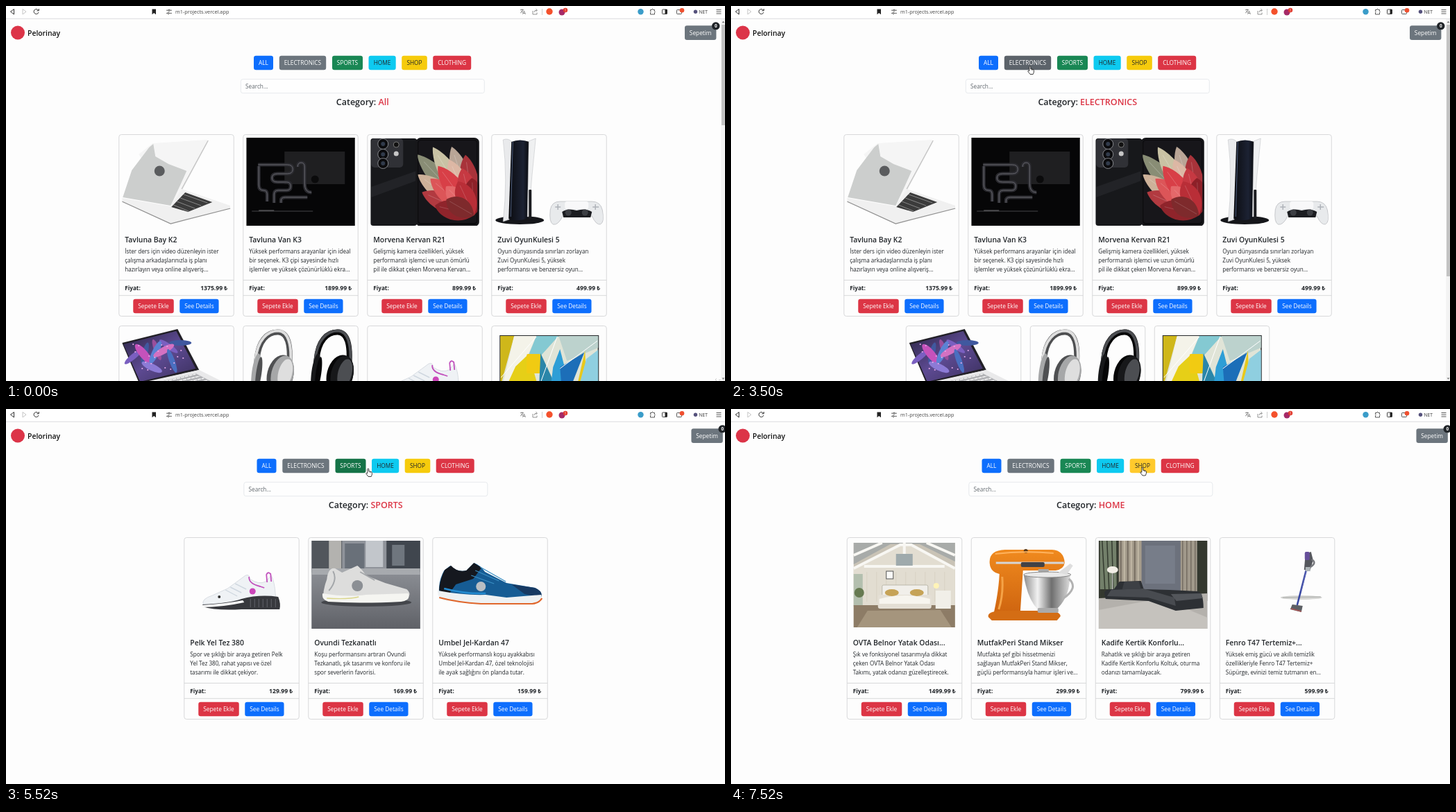
Recreate the animation shown at these times as an HTML page. Size 1036 by 541 pixels, loop 8 s.

```html
<!DOCTYPE html>
<html lang="tr">
<head>
<meta charset="utf-8">
<title>Shop</title>
<style>
html, body { margin: 0; width: 100%; height: 100%; overflow: hidden; background: #fdfdfd; }
svg { display: block; }
text { font-family: "Open Sans", "Noto Sans", sans-serif; white-space: pre; }
</style>
</head>
<body>
<svg id="stage" width="1036" height="541" viewBox="0 0 1036 541"></svg>
<script>
const INK = '#212529', RED = '#dc3545', BLUE = '#0d6efd', GREY = '#6c757d';

const rect = (x, y, w, h, fill, rx = 0, more = '') =>
  `<rect x="${x}" y="${y}" width="${w}" height="${h}" rx="${rx}" fill="${fill}" ${more}/>`;
const poly = (points, fill, more = '') => `<polygon points="${points}" fill="${fill}" ${more}/>`;
const path = (d, fill, more = '') => `<path d="${d}" fill="${fill}" ${more}/>`;
const line = (d, color, width = 1, more = '') =>
  `<path d="${d}" fill="none" stroke="${color}" stroke-width="${width}" ${more}/>`;
const oval = (cx, cy, rx, ry, fill, turn = 0, more = '') =>
  `<ellipse cx="${cx}" cy="${cy}" rx="${rx}" ry="${ry}" fill="${fill}" transform="rotate(${turn} ${cx} ${cy})" ${more}/>`;
const dot = (x, y, r, fill, more = '') => oval(x, y, r, r, fill, 0, more);
const text = (x, y, s, size = 8.15, fill = INK, anchor = 'start', weight = 400) =>
  `<text x="${x}" y="${y}" font-size="${size}" fill="${fill}" text-anchor="${anchor}" font-weight="${weight}">${s}</text>`;
const at = (x, y, s) => `<g transform="translate(${x} ${y})">${s}</g>`;
const repeat = (n, draw) => Array.from({ length: n }, (_, i) => draw(i)).join('');

const defs = `<defs>
<linearGradient id="dusk" x2="1" y2="1"><stop stop-color="#2b2544"/><stop offset=".5" stop-color="#5d4a92"/><stop offset="1" stop-color="#3a2f5c"/></linearGradient>
<linearGradient id="tower"><stop stop-color="#0b0c10"/><stop offset=".7" stop-color="#1c2233"/><stop offset="1" stop-color="#07080b"/></linearGradient>
<linearGradient id="orange" x2="0" y2="1"><stop stop-color="#f08a1e"/><stop offset="1" stop-color="#cf6510"/></linearGradient>
<linearGradient id="steel"><stop stop-color="#8d8d8d"/><stop offset=".3" stop-color="#f2f2f2"/><stop offset=".6" stop-color="#6f6f6f"/><stop offset="1" stop-color="#dcdcdc"/></linearGradient>
<linearGradient id="road" x2="0" y2="1"><stop stop-color="#8b8e94"/><stop offset="1" stop-color="#5f6167"/></linearGradient>
</defs>`;

const headset = (light, mid, dark) =>
  line('M15 50C16 15 32 4 46 4.5C60 5 64 24 62 50', dark, 8) +
  line('M13 48C15 14 32 2.5 46 2.5C61 3 65 24 64 46', light, 4) +
  oval(14, 62, 6, 27, mid, 8) + oval(18, 64, 4, 24, dark, 8) +
  oval(49, 66, 19, 29, dark, 14) + oval(52, 65, 16, 27, mid, 14) + oval(56, 64, 10, 21, light, 14);

const petal = ([turn, length, color]) =>
  `<g transform="translate(149 112) rotate(${turn}) scale(1 ${length / 100})">` +
  path('M0 0C-20 -30 -17 -80 0 -100C17 -80 20 -30 0 0Z', color) + line('M0 -8V-88', '#ffffff40', .8) + '</g>';

// Every picture is drawn in a 156.5 x 127 box.
const pictures = {
  whiteLaptop: () =>
    poly('24,24 44,8 122,3 124,6 88,74 72,98', '#f5f5f5') +
    poly('1,86 14,47 39,14 45,9 48,27 67,38 93,48 84,68 70,98', '#cccecd') +
    line('M124 4L86 74', '#c4c4c4', 1.4) +
    poly('0,87 70,99 86,74 156,98 155,103 70,125 0,93', '#f0f0f0') +
    poly('71,100 91,79 130,93 95,107', '#3b3b3b') +
    repeat(4, i => line(`M${74 + i * 5} ${97 - i * 5}L${96 + i * 9} ${106 - i * 4}`, '#a9a9a9', .7)) +
    line('M0 92L70 124L156 102', '#8f8f8f', 1.2) + dot(54, 48, 7.5, '#5a5c5e'),

  darkLaptop: () =>
    rect(0, 0, 157, 127, '#060607') + rect(55, 20, 87, 47, '#1f1f21') +
    ['#2b2b30', '#68686f'].map((c, i) => line(
      'M17 39H59Q67 39 67 45.5T59 52H45Q37 52 37 58T45 64H58Q64 64 64 70T58 76H46Q40 76 40 82V94' +
      'M18 41V68Q18 76 25 76Q30 76 30 82V92M74 42Q74 36 79 36Q84 36 84 42V66Q84 79 94 79M50 94V91Q50 86 56 86H88', c, 5 - i * 4)).join('') +
    dot(99, 60, 5.5, '#0b0b0c') + line('M8 106H96', '#55555a', .8) + line('M18 105H40', '#8c8c90', .8),

  phone: () =>
    rect(0, 1, 67, 126, '#17181b', 4) + rect(1, 1, 46, 42, '#303136', 5) +
    [9, 24, 37].map(y => dot(18, y, 7.5, '#0b0b0d', 'stroke="#85878c"') + dot(18, y, 3, '#303a4a')).join('') +
    dot(37, 10, 4, '#111', 'stroke="#777"') + dot(37, 23, 3.5, '#c6c6c6') +
    poly('1,71 66,48 66,62 1,86', '#222327') +
    rect(66, 1, 90, 126, '#09090b', 6) + rect(69, 4, 84, 119, '#17161a', 4) +
    [[-43, 120, '#898d75'], [-31, 115, '#c9c2a4'], [-54, 100, '#cdb199'], [-18, 104, '#b9a596'],
     [-8, 88, '#a8333a'], [-66, 82, '#b23a40'], [-24, 88, '#dcb7a4'], [-50, 82, '#dc5558'],
     [-36, 88, '#d83f47'], [-14, 70, '#c63942'], [-76, 58, '#8f242b'], [-3, 54, '#8d2028'],
     [-44, 58, '#e4686a'], [-25, 54, '#b92e37'], [-60, 46, '#7e2a2c']].map(petal).join('') +
    rect(66.5, 1.5, 89, 125, 'none', 6, 'stroke="#17171a" stroke-width="3"'),

  console: () =>
    oval(36, 119, 35, 6, '#15161a') +
    path('M12 3Q19 0 25 6L21 118L12 121Q19 60 12 3Z', '#e9eaec', 'stroke="#b9bbbf" stroke-width=".5"') +
    path('M24 6Q36 1 50 6L48 116Q32 122 20 117Z', 'url(#tower)') +
    path('M49 5L59 1Q53 55 49 114L47 114Z', '#eff0f1', 'stroke="#b9bbbf" stroke-width=".5"') +
    line('M26 6L23 114', '#5f7399', .8) + rect(49, 75, 4, 42, '#1b1c20', 1) +
    path('M80 104Q82 92 94 92H140Q152 92 155 104Q159 122 152 125Q146 126 140 113H98Q91 127 84 125Q78 122 80 104Z', '#e8eaec', 'stroke="#a9acb1" stroke-width=".6"') +
    path('M97 107Q105 101 118 105Q131 101 140 107L138 115H99Z', '#1b1c20') + rect(101, 92, 34, 11, '#f8f8f9', 3) +
    dot(106, 108, 4.5, '#3b3d42') + dot(130, 108, 4.5, '#3b3d42') +
    line('M87 100H95M91 96V104M141 100H150M145 96V104', '#afb3b9', 1.5),

  flowerLaptop: () =>
    poly('0,20 80,0 111,59 25,79', '#222027') + poly('2,22 78,3 106,57 26,76', 'url(#dusk)') +
    repeat(5, i => oval(16 + i * 17, 40 - i * 5, 4, 16, ['#7a5fc0', '#40589f', '#9a4f9c'][i % 3], 50 - i * 35)) +
    oval(31, 36, 6, 18, '#c552bb', -40) + oval(48, 34, 5, 18, '#5b82d4', 25) +
    oval(60, 31, 5, 17, '#d371c2', 60) + oval(43, 55, 5, 16, '#8c7bd6', -65) + oval(72, 46, 4, 18, '#4a6fc0', -20) +
    repeat(18, i => dot(16 + i * 23 % 74, 22 + i * 17 % 42, 1.1, '#e2a8e8')) +
    poly('25,78 111,59 157,82 140,105 30,105', '#e9e9ea') + poly('42,79 106,64 143,83 60,100', '#b1b2b5') +
    repeat(6, i => line(`M${44 + i * 3} ${80 + i * 3}L${106 + i * 6} ${65 + i * 3}`, '#f6f6f6', 1.5, 'stroke-dasharray="5 1"')),

  headphones: () =>
    headset('#dedede', '#a6a7a8', '#4f5052') + at(86, 0, headset('#4c4e52', '#17181a', '#060607')),

  airShoe: () =>
    path('M23 92Q20 84 36 79L58 69L84 50Q90 48 90 55Q103 64 113 59L121 50Q126 60 127 78L132 91Z', '#eff2f5', 'stroke="#ccd2d9" stroke-width=".7"') +
    path('M22 92Q62 90 78 84Q104 77 131 81Q135 91 133 99H78Q40 101 22 95Z', '#37383d') +
    path('M21 93Q55 91 80 86L82 89Q50 96 21 96Z', '#fafafa') +
    repeat(7, i => line(`M${91 + i * 6} 84V96`, '#6c6e75', .8)) +
    line('M115 60L114 49Q116 44 120 48L121 59M89 52Q88 62 105 66L111 68', '#c252bd', 1.8) +
    dot(94, 73, 4.5, '#cb45b9') + line('M55 71L72 80M62 67L78 75M69 62L85 70', '#cfd7df', 1.4) + dot(46, 81, 2, '#333'),

  television: () =>
    rect(7, 9, 143, 86, '#26282b') + rect(8.5, 10.5, 140, 84, '#e0e4d7') +
    poly('8,10 28,10 10,76 8,80', '#cfb71a') + poly('28,10 60,10 30,78 12,78', '#f4f3e9') +
    poly('60,10 92,10 56,50 49,37', '#84c9d2') + poly('92,10 149,10 149,27 104,46', '#bcd2cd') +
    poly('30,54 49,36 61,78 18,80', '#e6cf17') + rect(46, 36, 20, 28, '#f1cb12', 2) +
    poly('66,35 86,78 64,80', '#2a86a9') + poly('84,55 94,29 107,80 81,80', '#2e9ed6') +
    poly('94,55 129,34 111,80 96,80', '#1c6eb8') + poly('130,31 119,80 132,74', '#e8c81b') +
    poly('132,43 149,30 149,80 122,80', '#8fcfe0') + line('M9 70L60 11M90 11L65 80M148 17L94 57', '#fff', 1),

  streetShoe: () =>
    rect(0, 0, 157, 127, '#8f939a') + rect(0, 0, 44, 46, '#51565c') + rect(25, 0, 18, 42, '#b3b2af') +
    rect(48, 4, 28, 40, '#697079') + rect(78, 0, 25, 38, '#c2c6cb') + rect(108, 0, 49, 45, '#40464e') +
    rect(116, 6, 18, 30, '#6f767e') + rect(0, 45, 157, 82, 'url(#road)') + rect(0, 40, 157, 9, '#a7aaae') +
    oval(79, 89, 65, 6, '#44464b') +
    path('M17 83Q16 72 22 56Q24 38 34 40L44 46L66 36Q74 42 78 50L106 61L137 70Q145 77 138 83Q80 88 17 83Z', '#dddddc') +
    path('M16 76Q50 82 78 78L139 76Q144 86 129 88Q70 91 24 88Q14 85 16 76Z', '#f5f5f1') +
    dot(66, 65, 8, '#8b8f94') + line('M70 45L91 57M31 44Q38 57 25 72', '#a4a7aa', 2) +
    line('M22 83Q52 85 68 81', '#d9d58a', 1.4),

  blueShoe: () =>
    path('M5 78Q3 59 12 43L21 36Q31 46 44 43L55 32Q64 35 71 45L102 61L143 68Q156 74 151 84L80 87L18 83Z', '#165c94') +
    path('M5 72Q5 58 13 42L22 36Q31 46 44 43L55 32L66 39L54 55L29 63L19 77Z', '#15181f') +
    path('M109 63L143 68Q156 74 151 82L128 77Z', '#173a63') +
    path('M3 72Q40 79 72 78L102 82L152 78Q154 90 140 91L60 92L11 86Q2 82 3 72Z', '#eef1f3') +
    line('M5 82Q31 89 65 91H139Q149 90 153 83', '#e0662b', 2.2) +
    line('M57 43L91 58M64 38L101 59M51 50L84 62', '#3a8fc4', 1.3) + dot(65, 66, 7, '#b9bec3') +
    line('M12 69Q42 77 72 76', '#248bd0', 2.5),

  bedroom: () =>
    rect(5, 3, 146, 122, '#c9c3b6') + poly('5,3 151,3 151,30 100,5 58,5 5,34', '#a8aba9') +
    poly('5,40 70,8 88,8 151,40 151,94 5,94', '#e2ddd1') +
    line('M5 40L72 6L88 6L151 40M5 21L46 3M151 21L110 3M20 37H136M78 3V36', '#f8f7f3', 4) +
    repeat(9, i => line(`M${24 + i * 14} 45V88`, '#d0cabc', .6)) + rect(66, 19, 24, 17, '#9faaac') +
    rect(5, 48, 13, 47, '#b3bfae') + dot(13, 75, 7, '#667a51') + rect(52, 44, 10, 11, '#f9f9f7', 0, 'stroke="#555"') +
    poly('5,93 151,93 151,125 5,125', '#8d7c66') + poly('25,101 130,100 146,125 10,125', '#a5957d') +
    rect(46, 64, 66, 28, '#f1efea', 2, 'stroke="#aaa697" stroke-width=".7"') + rect(40, 78, 77, 20, '#e4dfd5', 3) +
    oval(60, 75, 10, 5, '#c6a357') + oval(96, 75, 10, 5, '#c6a357') + path('M42 84Q79 74 115 84V91H42Z', '#f7f5ef') +
    rect(123, 72, 22, 26, '#f1efe8') + dot(124, 65, 4, '#fff3b8'),

  mixer: () =>
    path('M22 33Q20 14 44 13H112Q129 14 130 32Q129 41 117 43H70L66 104H28Q35 72 36 48Q23 45 22 33Z', 'url(#orange)') +
    path('M20 110Q18 102 39 101H105Q124 102 124 109L119 115H25Z', '#d46d14') +
    line('M31 32H129', '#d6d6d6', 3) + rect(67, 31, 34, 7, '#414246', 2) + dot(74, 15, 3, '#5b3a1b') +
    line('M30 19Q70 14 114 18', '#ffb35d', 2) + rect(92, 41, 15, 8, '#a9a9a9') +
    path('M71 49H138Q137 83 118 99H91Q76 83 71 49Z', 'url(#steel)') + oval(105, 49, 34, 4, '#e9e9e9', 0, 'stroke="#888"') +
    line('M136 55Q151 68 127 84', '#b2b2b2', 3) + path('M121 46L138 33L142 36L133 49Z', '#dedede') + rect(91, 97, 30, 7, '#aaa', 2) +
    line('M40 52Q42 78 35 99', '#f5a347', 3),

  sofa: () =>
    rect(0, 0, 157, 127, '#6f7278') + rect(0, 0, 36, 85, '#34382f') + rect(2, 0, 24, 70, '#73806a') +
    repeat(4, i => line(`M${5 + i * 7} 0L${9 + i * 6} 70`, '#343a2f', 1.5)) +
    rect(29, 0, 33, 80, '#a59c8c') + repeat(6, i => line(`M${32 + i * 5} 0V80`, i % 2 ? '#c2b8a6' : '#776e62', 2)) +
    rect(62, 0, 57, 76, '#6c717c') + rect(67, 7, 43, 55, '#777d89') + rect(118, 0, 24, 88, '#a1998b') +
    repeat(4, i => line(`M${121 + i * 6} 0V88`, '#756d62', 1.5)) + rect(142, 0, 15, 87, '#34382f') +
    poly('0,83 157,76 157,127 0,127', '#b4b1ac') + poly('0,100 90,83 157,111 157,127 0,127', '#c5c2bd') +
    oval(20, 42, 8, 5, '#f2eee6') + line('M20 47V74', '#ddd', 1) +
    path('M8 75Q9 70 22 70L30 59L61 58L65 70L102 71L143 73Q151 75 151 97L111 101L72 87L10 84Z', '#2d3034') +
    path('M18 71L64 69L109 82L111 94L71 82L12 80Z', '#484b50') + path('M104 77L148 76L150 83L112 87Z', '#53565b') +
    path('M37 59L58 59L61 70H34Z', '#3d4045'),

  vacuum: () =>
    oval(113, 82, 30, 3, '#d6d6d4') + line('M86 82L141 81', '#b7b9b6', 1.5) +
    line('M122 35L107 93', '#3948a2', 2.6) + line('M122 36L113 73', '#7078c1', .8) +
    path('M119 19L127 16L130 28L126 42H117Z', '#55575d') + rect(118, 16, 7, 12, '#664f9a', 2) +
    line('M128 27Q136 32 126 38', '#76787d', 2.5) + rect(119, 38, 7, 6, '#aeb5b8') +
    poly('100,92 115,94 113,103 97,99', '#5d6065') + line('M98 98L113 102', '#a55', 1.3)
};

const product = (picture, title, price, ...lines) => ({ picture, title, price, lines });
const tops = [
  product('whiteLaptop', 'Tavluna Bay K2', '1375.99', 'İster ders için video düzenleyin ister', 'çalışma arkadaşlarınızla iş planı', 'hazırlayın veya online alışveriş...'),
  product('darkLaptop', 'Tavluna Van K3', '1899.99', 'Yüksek performans arayanlar için ideal', 'bir seçenek. K3 çipi sayesinde hızlı', 'işlemler ve yüksek çözünürlüklü ekra...'),
  product('phone', 'Morvena Kervan R21', '899.99', 'Gelişmiş kamera özellikleri, yüksek', 'performanslı işlemci ve uzun ömürlü', 'pil ile dikkat çeken Morvena Kervan...'),
  product('console', 'Zuvi OyunKulesi 5', '499.99', 'Oyun dünyasında sınırları zorlayan', 'Zuvi OyunKulesi 5, yüksek', 'performansı ve benzersiz oyun...')
];
const sports = [
  product('airShoe', 'Pelk Yel Tez 380', '129.99', 'Spor ve şıklığı bir araya getiren Pelk', 'Yel Tez 380, rahat yapısı ve özel', 'tasarımı ile dikkat çekiyor.'),
  product('streetShoe', 'Ovundi Tezkanatlı', '169.99', 'Koşu performansını artıran Ovundi', 'Tezkanatlı, şık tasarımı ve konforu ile', 'spor severlerin favorisi.'),
  product('blueShoe', 'Umbel Jel-Kardan 47', '159.99', 'Yüksek performanslı koşu ayakkabısı', 'Umbel Jel-Kardan 47, özel teknolojisi', 'ile ayak sağlığını ön planda tutar.')
];
const home = [
  product('bedroom', 'OVTA Belnor Yatak Odası...', '1499.99', 'Şık ve fonksiyonel tasarımıyla dikkat', 'çeken OVTA Belnor Yatak Odası', 'Takımı, yatak odanızı güzelleştirecek.'),
  product('mixer', 'MutfakPeri Stand Mikser', '299.99', 'Mutfakta şef gibi hissetmenizi', 'sağlayan MutfakPeri Stand Mikser,', 'güçlü performansıyla hamur işleri ve...'),
  product('sofa', 'Kadife Kertik Konforlu...', '799.99', 'Rahatlık ve şıklığı bir araya getiren', 'Kadife Kertik Konforlu Koltuk, oturma', 'odanızı tamamlayacak.'),
  product('vacuum', 'Fenro T47 Tertemiz+...', '599.99', 'Yüksek emiş gücü ve akıllı temizlik', 'özellikleriyle Fenro T47 Tertemiz+', 'Süpürge, evinizi temiz tutmanın en...')
];
const cut = names => names.map(picture => ({ picture }));
const views = {
  All: { rows: [tops, cut(['flowerLaptop', 'headphones', 'airShoe', 'television'])], thumb: 172 },
  ELECTRONICS: { rows: [tops, cut(['flowerLaptop', 'headphones', 'television'])], thumb: 390 },
  SPORTS: { rows: [sports] },
  HOME: { rows: [home] }
};

// name, left, width, colour, hover colour, text colour
const filters = [
  ['ALL', 357, 28, BLUE, '#0b5ed7', '#fff'],
  ['ELECTRONICS', 393.8, 67.4, GREY, '#5c636a', '#fff'],
  ['SPORTS', 470, 44, '#198754', '#157347', '#fff'],
  ['HOME', 522.5, 39.2, '#0dcaf0', '#31d2f2', INK],
  ['SHOP', 570.2, 36.6, '#f6cb0c', '#ffca2c', INK],
  ['CLOTHING', 615.2, 55, RED, '#bb2d3b', '#fff']
];

const button = (x, y, w, label, fill, color = '#fff') =>
  rect(x, y, w, 20.6, fill, 3.2) + text(x + w / 2, y + 13.4, label, 8.3, color, 'middle');

const card = ({ picture, title, price, lines }) =>
  rect(.5, .5, 165.5, 262, '#fdfdfd', 3.5, 'stroke="#d4d5d6" stroke-width=".9"') +
  `<svg x="5" y="5" width="156.5" height="127">${pictures[picture]()}</svg>` +
  (title ? text(9, 156, title, 10.4, INK, 'start', 600) +
    lines.map((s, i) => text(9, 172.2 + i * 13, s)).join('') +
    line('M.5 210.5H166M.5 232.7H166', '#d4d5d6', .9) +
    text(9, 225.2, 'Fiyat:', 8.2, INK, 'start', 700) + text(157, 225.2, price + ' ₺', 8.6, INK, 'end', 700) +
    button(21, 237.7, 58.5, 'Sepete Ekle', RED) + button(88, 237.7, 56.3, 'See Details', BLUE) : '');

const browserBar =
  rect(0, 0, 1036, 18, '#fff') + line('M0 18.3H1036', '#d5d5d8', .8) +
  line('M11.5 4.5L6.5 8.2L11.5 12Z', '#333') + line('M24 4.5L29 8.2L24 12Z', '#c4c4c4') +
  line('M46.6 6.2A3.5 3.5 0 1 0 47 9M47.3 4V6.8H44.5', '#333') +
  path('M210.5 4.5H216V12.3L213.2 10L210.5 12.3Z', '#222') +
  line('M231 6.2H234M236 6.2H239M231 10.4H233M235 10.4H239', '#555', .9) +
  dot(235, 6.2, 1.2, '#fff', 'stroke="#555"') + dot(234, 10.4, 1.2, '#fff', 'stroke="#555"') +
  text(244, 11, 'm1-projects.vercel.app', 7.3, '#444') +
  line('M741 5.5H746M743.5 4V5.5M745 5.5Q744 9 741 10M742 7L745 9.5M744.5 12L746.5 7L748.5 12M745.2 10.5H748', '#777', .8) +
  line('M759 7V12H765V9.5M761 9Q761 6 765 6M763.5 4.2L765.5 6L763.5 8', '#777', .8) +
  line('M772.5 4V13', '#ccc') + dot(783, 8, 4.7, '#f4512c') +
  dot(801, 9, 4.5, '#a52a68') + dot(806, 6, 3.2, '#e23b2e') + text(806, 8, '1', 5, '#fff', 'middle') +
  dot(914.5, 8.2, 4.2, '#3a9cc9') +
  line('M928.5 5.5H930.5Q930.5 4 932 4.4Q933 5 932.8 5.5H934.5V7.5Q936 8 934.5 9.6V12H928.5V9.6Q930 8.5 928.5 7.6Z', '#444', .9) +
  rect(945.5, 5, 7, 6.5, '#fff', .8, 'stroke="#333" stroke-width=".9"') + rect(949.5, 5, 3, 6.5, '#222') +
  rect(966.5, 5.5, 7, 6, '#fff', .8, 'stroke="#444" stroke-width=".9"') + dot(974, 6.3, 3.3, '#ef5030') +
  dot(993.5, 8.2, 2.7, '#55517c') + text(998.5, 10.7, 'NET', 6.6, '#333') +
  line('M1023.5 5.5H1030.5M1023.5 8.2H1030.5M1023.5 11H1030.5', '#444', .9);

const scrollbar = bottom =>
  rect(1030.3, 19, 5.7, 522, '#f3f3f3') + rect(1031, 27, 5, bottom - 27, '#c3c3c3') +
  path('M1031.5 24.2L1033.5 21.8L1035.5 24.2ZM1031.5 536.4L1033.5 538.8L1035.5 536.4Z', '#777');

const cursors = {
  none: '',
  corner: line('M1 3L3 1.5M1 3L3 5M6 3.5H9M11 2L14 4', '#c5c5c5', .8),
  beam: line('M.3 .5H3.7M2 .5V8.5M.3 8.5H3.7', '#222', .8),
  arrow: path('M.5 .5V9L2.6 7.2L4 10L5.3 9.4L4 6.7H7Z', '#fff', 'stroke="#111" stroke-width=".7"'),
  hand: path('M2.9 7.4V1.5Q3.8 .2 4.8 1.5V4.9Q9.5 5 9.5 7.4Q9.5 10.4 8.2 12.5H4L.8 8.3Q.7 6.5 2.9 7.8Z', '#fff', 'stroke="#111" stroke-width=".8"') +
    line('M6.3 5.2V7M7.9 5.5V7.2', '#111', .5)
};

// start time, view, hovered filter, cursor, cursor left, cursor top
const steps = [
  [0, 'All', '', 'corner', 1021, 536],
  [500, 'All', '', 'none', 0, 0],
  [990, 'All', '', 'beam', 737, 330],
  [1510, 'All', '', 'arrow', 744.5, 240],
  [2010, 'All', '', 'beam', 413, 111],
  [2510, 'All', 'ALL', 'hand', 371, 85],
  [2990, 'All', 'ELECTRONICS', 'hand', 405, 85],
  [3500, 'ELECTRONICS', 'ELECTRONICS', 'hand', 427, 86],
  [4500, 'ELECTRONICS', 'SPORTS', 'hand', 494, 86],
  [5000, 'SPORTS', 'SPORTS', 'hand', 494, 86],
  [5520, 'SPORTS', 'SPORTS', 'hand', 518, 85],
  [6020, 'SPORTS', 'HOME', 'hand', 533, 84],
  [6520, 'HOME', 'HOME', 'hand', 558, 84],
  [7020, 'HOME', 'SHOP', 'hand', 588, 84],
  [7520, 'HOME', 'SHOP', 'hand', 589, 83.5]
];

function scene([, name, hover, cursor, x, y]) {
  const { rows, thumb } = views[name];
  const shift = thumb ? 0 : 4.5, center = 513.75 + shift, cart = 978 + shift * 2.1;
  return defs + rect(0, 0, 1036, 541, '#fdfdfd') + browserBar +
    dot(17, 38.5, 10, '#dc3448') + text(31, 43, 'Pelorinay', 10.4, '#111', 'start', 600) +
    (thumb ? scrollbar(thumb) : '') +
    button(cart, 28.3, 45.4, 'Sepetim', GREY) +
    rect(cart + 39, 23.3, 11.5, 11, INK, 5.5) + text(cart + 44.8, 31.2, '0', 6.4, '#fff', 'middle', 700) +
    filters.map(([label, left, w, fill, over, color]) =>
      button(left + shift, 71.7, w, label, label === hover ? over : fill, color)).join('') +
    rect(338.3 + shift, 105.7, 351, 20, '#fefefe', 3, 'stroke="#e1e5e9" stroke-width=".8"') +
    text(345 + shift, 119, 'Search...', 8.25, '#62686e') +
    text(center, 143.4, `Category: <tspan fill="${RED}">${name}</tspan>`, 12.5, INK, 'middle', 600) +
    rows.map((row, r) => row.map((item, i) =>
      at(center - (row.length * 179 - 13) / 2 + i * 179, 185 + r * 276, card(item))).join('')).join('') +
    at(x, y, cursors[cursor]);
}

const stage = document.getElementById('stage');
const start = performance.now();
let shown;
function tick() {
  const time = (performance.now() - start) % 8000;
  const step = steps.findLast(([from]) => from <= time);
  if (step !== shown) stage.innerHTML = scene(shown = step);
  requestAnimationFrame(tick);
}
tick();
</script>
</body>
</html>
```
